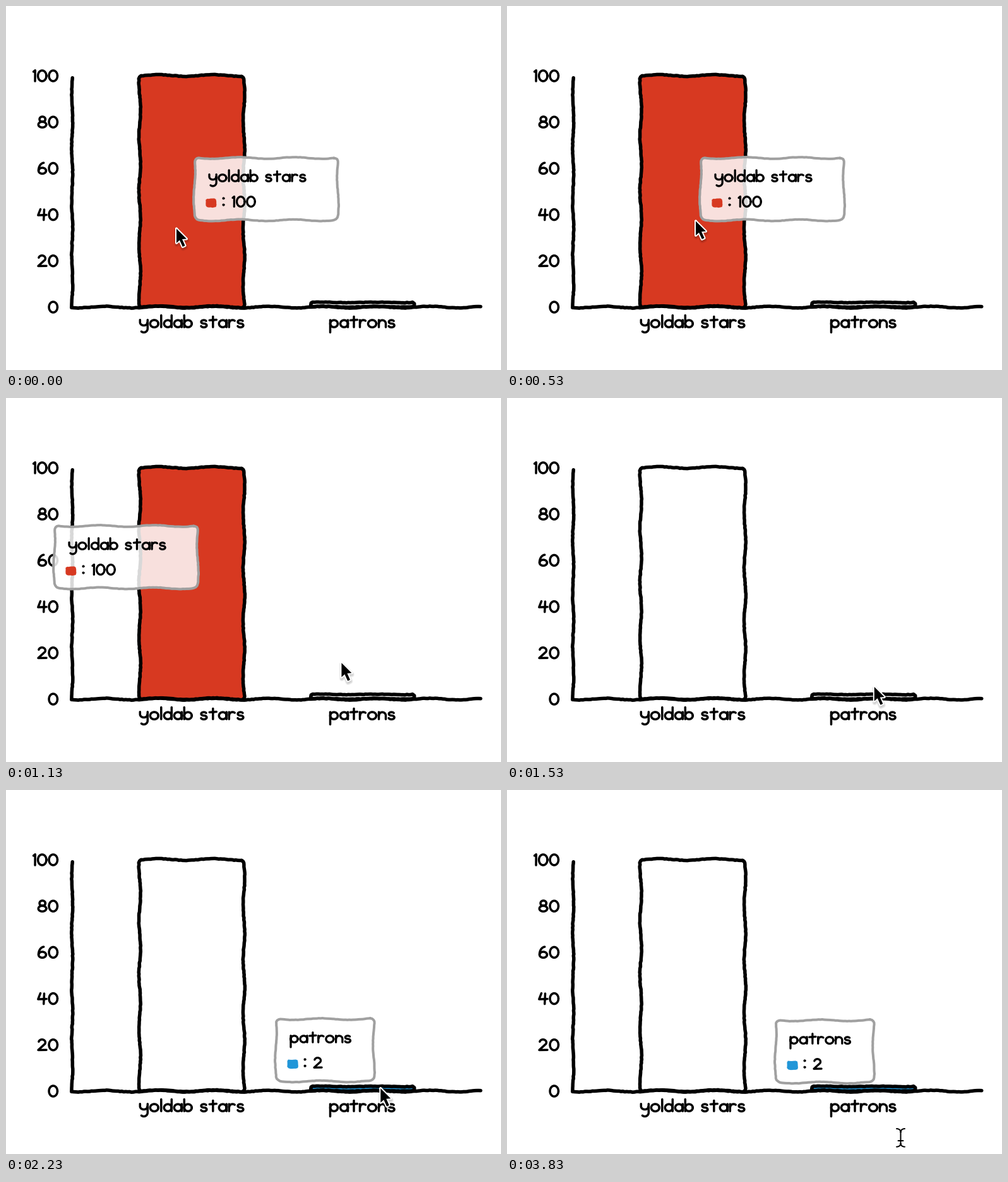
Recreate the animation shown at these times as a matplotlib script. Size 784 by 576 pixels, loop 3.86 s.

```python
import matplotlib.pyplot as plt
import numpy as np
from matplotlib.animation import FuncAnimation
from matplotlib.patches import PathPatch
from matplotlib.path import Path
from matplotlib.transforms import Affine2D

W, H, DPI = 784, 576, 64
PX = 72 / DPI
LOOP, STEP = 3860, 20
RED, BLUE, GREY = "#d73921", "#2196d8", "#a0a0a0"
INK, PEN = 5.5, 3.5

rng = np.random.default_rng(4)
fig = plt.figure(figsize=(W / DPI, H / DPI), dpi=DPI, facecolor="white")
ax = fig.add_axes([0, 0, 1, 1])
ax.set(xlim=(0, W), ylim=(H, 0))
ax.axis("off")


# Shapes
def line(*points):
    return np.array(points, float)


def arc(cx, cy, rx, ry, start=0, end=360):
    a = np.radians(np.linspace(start, end, 20))
    return np.column_stack([cx + rx * np.cos(a), cy + ry * np.sin(a)])


def join(*parts):
    return np.vstack(parts)


def round_rect(x, y, w, h, r):
    left, right, top, bottom = x + r, x + w - r, y + r, y + h - r
    return join(arc(right, top, r, r, -90, 0), arc(right, bottom, r, r, 0, 90),
                arc(left, bottom, r, r, 90, 180), arc(left, top, r, r, 180, 270),
                line((right, y)))


def hand_drawn(points, sway=1.3, rough=0.4):
    """Resample an outline and push it about with slow waves and fine noise."""
    dist = np.append(0, np.cumsum(np.hypot(*np.diff(points, axis=0).T)))
    s = np.linspace(0, dist[-1], int(dist[-1] / 3) + 2)
    x, y = (np.interp(s, dist, points[:, k]) for k in (0, 1))
    wave = 2 * np.pi / 86
    moved = np.column_stack([x + sway * np.cos(wave * (y - 335 + 0.15 * (x - 212))),
                             y + sway * np.cos(wave * (x - 372))])
    moved += rng.uniform(-rough, rough, moved.shape)
    if np.allclose(points[0], points[-1]):
        moved[-1] = moved[0]
    return moved


def add(shapes, fill="none", edge="none", width=0.0, z=1, alpha=None, move=None):
    shapes = shapes if isinstance(shapes, list) else [shapes]
    path = Path.make_compound_path(*map(Path, shapes))
    path.should_simplify = False
    patch = PathPatch(path, facecolor=fill, edgecolor=edge, linewidth=width * PX,
                      capstyle="round", joinstyle="round", zorder=z, alpha=alpha)
    if move is not None:
        patch.set_transform(move + ax.transData)
    return ax.add_patch(patch)


# Handwritten letters: width and strokes, baseline at 0, y upwards
def stem(x, top, bottom=0.3):
    return line((x, top), (x, bottom))


BOWL = arc(6, 5.8, 6, 5.6)
GLYPHS = {
    "a": (12, [BOWL, stem(12, 11.5)]),
    "b": (12, [BOWL, stem(0, 19)]),
    "d": (12, [BOWL, stem(12, 19)]),
    "l": (1, [stem(0.5, 19)]),
    "n": (11, [stem(0, 11.5), join(arc(5.5, 6, 5.5, 5.3, 180, 0), line((11, 0.3)))]),
    "o": (13, [arc(6.5, 5.8, 6.5, 5.8)]),
    "p": (12, [BOWL, stem(0, 11.5, -8)]),
    "r": (9, [stem(0, 11.5), arc(5.5, 6.5, 5.3, 5, 180, 50)]),
    "s": (10, [join(arc(5, 8.7, 4.2, 2.7, 30, 270), arc(5, 3, 4.6, 3, 90, -160))]),
    "t": (11, [stem(5.5, 17), line((0, 11.2), (11, 12))]),
    "y": (12, [join(line((0, 11.8)), arc(6, 8, 6, 5, 180, 360)),
               join(line((12, 11.8)), arc(6, -2, 6, 6, 0, -130))]),
    "0": (13.5, [arc(6.75, 8.5, 6.75, 8.5)]),
    "1": (3, [line((0, 15), (2.7, 17.2), (2.5, 0))]),
    "2": (13, [join(arc(6, 12.3, 5.3, 4.7, 165, -30), line((0, 0.3), (13, 0.5)))]),
    "4": (13.5, [line((4, 17), (0.3, 7.5), (13.5, 8)), line((10, 16.5), (9.2, 0))]),
    "6": (13, [arc(9.5, 5, 9, 12.3, 95, 180), arc(6.5, 4.7, 6, 4.7)]),
    "8": (13, [arc(6.7, 13, 4.7, 4.2), arc(6.5, 4.5, 6.3, 4.5)]),
    ":": (1, [arc(0.5, y, 0.4, 0.4) for y in (2, 13)]),
    " ": (6, []),
}
GAP = 4


def write(text, x, y, scale=1.0, anchor=0.0, z=5, move=None):
    x -= anchor * scale * (sum(GLYPHS[c][0] + GAP for c in text) - GAP)
    strokes = []
    for char in text:
        width, shapes = GLYPHS[char]
        strokes += [shape * [scale, -scale] + [x, y] for shape in shapes]
        x += (width + GAP) * scale
    add(strokes, edge="black", width=PEN * scale, z=z, move=move)


# Chart
LEFT, RIGHT, TOP, BASE = 104.8, 753, 110, 476.5
add(hand_drawn(line((LEFT, TOP + 3), (LEFT, BASE)), 0.8), edge="black", width=INK, z=4)
add(hand_drawn(line((LEFT + 2, BASE), (RIGHT, BASE))), edge="black", width=INK, z=4)
for value in range(0, 101, 20):
    write(str(value), 81.5, 485 - 3.66 * value, anchor=1)


def bar(x, top, label, sway, radius):
    middle = x + 82.5
    write(label, middle, 508.5, anchor=0.5)
    outline = hand_drawn(round_rect(x, top, 165, BASE - 0.5 - top, radius), sway)
    return add(outline, edge="black", width=INK, z=2)


tall_bar = bar(211.8, TOP, "yoldab stars", 1.3, 3)
low_bar = bar(482, 469.1, "patrons", 0.4, 3)


# Tooltips, drawn around their own top left corner
def tooltip(width, title, value, color):
    move = Affine2D()
    before = len(ax.patches)
    frame = hand_drawn(round_rect(0.5, 0.5, width, 98.5, 7), rough=0.25)
    add(frame, "white", z=6, alpha=0.85, move=move)
    add(frame, edge=GREY, width=4, z=7, move=move)
    add(hand_drawn(round_rect(19, 64, 17, 14, 3), 0.8), color, z=8, move=move)
    write(title, 24, 37.5, 0.93, z=8, move=move)
    write(":", 46, 76.5, 0.93, z=8, move=move)
    write(value, 61, 77.5, 0.93, z=8, move=move)
    return move, ax.patches[before:]


stars_move, stars_tip = tooltip(227, "yoldab stars", "100", RED)
patrons_move, patrons_tip = tooltip(155, "patrons", "2", BLUE)

# Pointers
arrow_move = Affine2D()
ARROW = line((2, 4.5), (2, 27), (7, 22.5), (11.8, 33), (15.6, 31.2), (11, 21),
             (18, 20.5), (2, 4.5))
arrow = [add(ARROW + [0.5, 2.5], "black", "black", w, 9, 0.06, arrow_move) for w in (8, 6, 4)]
arrow += [add(ARROW, "white", "white", 4, 10, move=arrow_move),
          add(ARROW, "black", z=11, move=arrow_move)]

BEAM = [arc(623.5 + side * 6.5, 550.3 + end * 9.3, 6.5, 5, end * 90, end * (90 + side * 90))
        for side in (-1, 1) for end in (-1, 1)]
BEAM += [line((623.5, 541), (623.5, 559.6)), line((619.5, 555), (627.5, 555))]
beam = [add(BEAM, edge="white", width=4.5, z=10), add(BEAM, edge="black", width=2, z=11)]

# Times in ms
DRIFT, FLIP, LEAVE, ENTER, LAST = (30, 530, 770), 850, 1270, 1850, 3830


def pointer(t):
    """Drift over the tall bar, then glide to rest on the low one."""
    glide = max(t - DRIFT[-1], 0)
    x = np.interp(t, DRIFT, (268, 297, 320))
    y = np.interp(t, DRIFT, (348, 336, 313))
    return 592 + (x - 592) * np.exp(-glide / 245), 470 + (y - 470) * np.exp(-glide / 345)


def stars_corner(t):
    if t >= FLIP:
        return 76, 202
    return np.interp(t, DRIFT, (298, 306, 337)), np.interp(t, DRIFT, (240, 240, 204))


def show(artists, visible):
    for artist in artists:
        artist.set_visible(visible)


def draw(i):
    t = i * STEP + STEP / 2
    on_stars, on_patrons, done = t < LEAVE, t >= ENTER, t >= LAST
    tall_bar.set_facecolor(RED if on_stars else "white")
    low_bar.set_facecolor(BLUE if on_patrons else "white")

    stars_move.clear().translate(*stars_corner(t))
    patrons_move.clear().translate(*((425, 364) if done else (427, 362)))
    arrow_move.clear().translate(*pointer(t))
    show(stars_tip, on_stars)
    show(patrons_tip, on_patrons)
    show(arrow, not done)
    show(beam, done)
    return []


anim = FuncAnimation(fig, draw, frames=LOOP // STEP, interval=STEP, repeat=True,
                     repeat_delay=0, blit=False)
plt.show()
```
